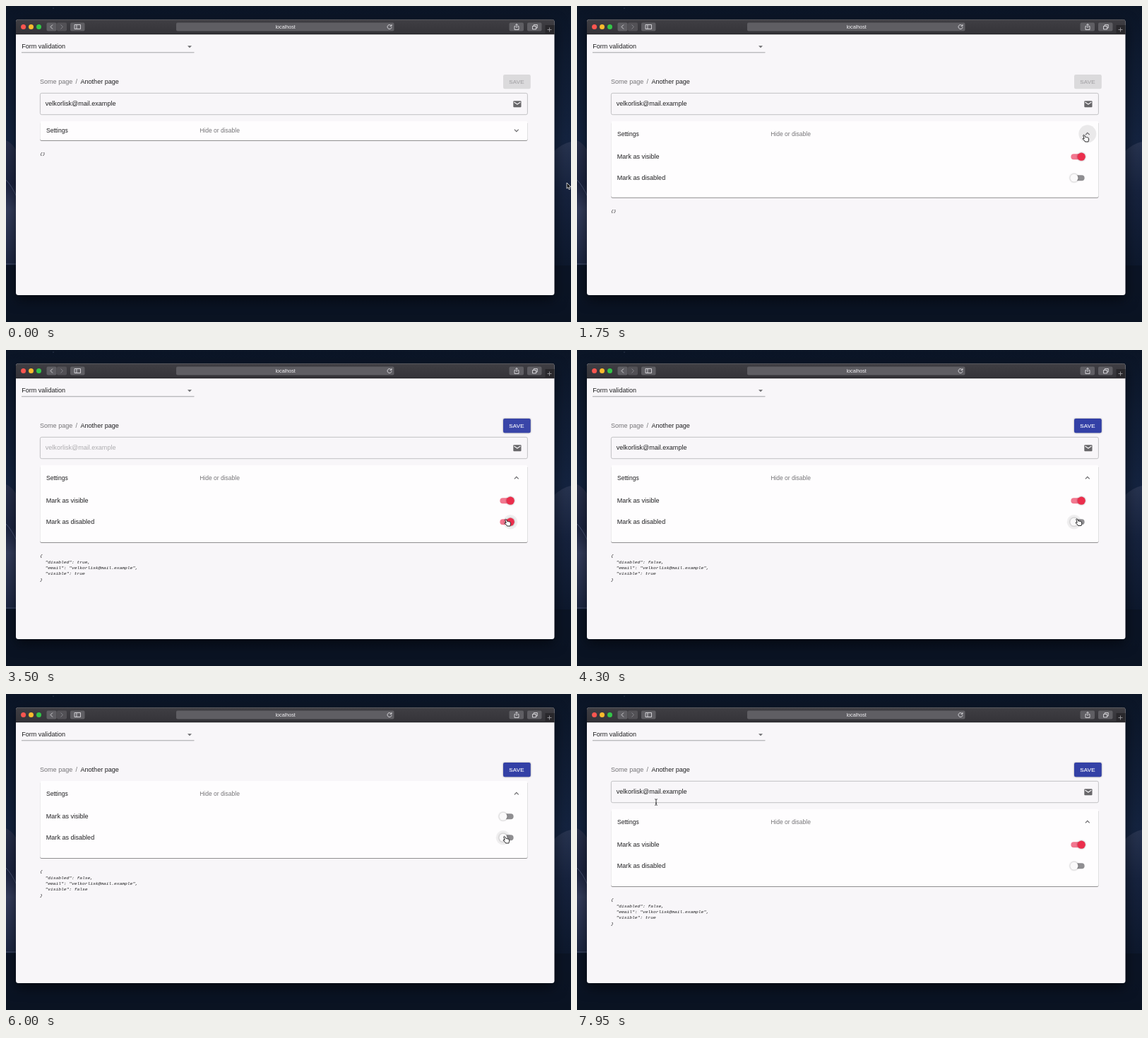
Recreate the animation shown at these times as an HTML page. Size 800 by 447 pixels, loop 8000 ms.

```html
<!DOCTYPE html>
<html lang="en">
<head>
<meta charset="utf-8">
<title>Form validation</title>
<style>
html, body { margin: 0; width: 100%; height: 100%; overflow: hidden; background: #0b1424; }
svg { display: block; width: 800px; height: 447px; }
text { font-family: "Liberation Sans", Arial, sans-serif; font-size: 9.05px; fill: #202022; white-space: pre; }
.small { font-size: 8.5px; }
.dim { fill: #767578; }
.json text { font-family: "Liberation Mono", "Courier New", monospace; font-size: 6.26px; font-style: italic; }
.btn { fill: #5f5e63; }
.ico { fill: none; stroke: #dddce0; stroke-width: .9; }
.paper { fill: #fefdfe; filter: drop-shadow(0 1px .7px rgba(0,0,0,.42)); }
.lift { filter: drop-shadow(0 .7px .8px rgba(0,0,0,.4)); }
.win { filter: drop-shadow(0 6px 9px rgba(0,0,0,.55)); }
</style>
</head>
<body>
<svg viewBox="0 0 800 447">
  <defs>
    <linearGradient id="sky" x1="0" y1="0" x2="0" y2="1">
      <stop offset="0" stop-color="#0b1526"/><stop offset=".42" stop-color="#14233f"/>
      <stop offset=".8" stop-color="#0e1a30"/><stop offset="1" stop-color="#0a1322"/>
    </linearGradient>
    <linearGradient id="duneL" x1="0" y1="0" x2="0" y2="1">
      <stop offset="0" stop-color="#28304b"/><stop offset=".35" stop-color="#1c2440"/>
      <stop offset=".55" stop-color="#343d5c"/><stop offset="1" stop-color="#1d2742"/>
    </linearGradient>
    <linearGradient id="duneR" x1="0" y1="0" x2="0" y2="1">
      <stop offset="0" stop-color="#27334f"/><stop offset=".4" stop-color="#16223d"/>
      <stop offset="1" stop-color="#0d182c"/>
    </linearGradient>
    <linearGradient id="bar" x1="0" y1="0" x2="0" y2="1">
      <stop offset="0" stop-color="#403f44"/><stop offset="1" stop-color="#343338"/>
    </linearGradient>
    <clipPath id="clip"><rect id="clipBox" x="48" width="691" y="0"/></clipPath>
  </defs>

  <rect width="800" height="447" fill="url(#sky)"/>
  <path d="M0 190Q8 193 16 206V366H0Z" fill="url(#duneL)"/>
  <path d="M0 246Q8 254 16 272" fill="none" stroke="#4a5474"/>
  <path d="M0 365H16" stroke="#46506c"/>
  <path d="M774 207Q788 194 800 192V372H774Z" fill="url(#duneR)"/>
  <path d="M0 367H800V447H0Z" fill="#0a1323" opacity=".7"/>
  <circle cx="67" cy="3" r=".6" fill="#53607c"/>

  <rect class="win" x="14" y="19" width="762.5" height="390" rx="3.5" fill="#f8f6f9"/>
  <path d="M14 40V22.5Q14 19 17.5 19H773Q776.5 19 776.5 22.5V40Z" fill="url(#bar)"/>
  <path d="M17 19.4H773" stroke="#68676c" stroke-width=".7"/>
  <path d="M14 39.8H776.5" stroke="#19181b" stroke-width=".8"/>
  <circle cx="24.6" cy="29.5" r="3.5" fill="#fb5650"/>
  <circle cx="35.5" cy="29.5" r="3.5" fill="#fcbb2d"/>
  <circle cx="46.5" cy="29.5" r="3.5" fill="#33c648"/>
  <g class="btn">
    <rect x="57.5" y="23.5" width="14" height="12" rx="2"/>
    <rect x="72" y="23.5" width="14" height="12" rx="2" opacity=".65"/>
    <rect x="91" y="23.5" width="20.5" height="12" rx="2"/>
    <rect x="241" y="23.5" width="308.5" height="12" rx="2"/>
    <rect x="712.5" y="23.5" width="20.5" height="12" rx="2"/>
    <rect x="738" y="23.5" width="20.5" height="12" rx="2"/>
  </g>
  <g class="ico">
    <path d="M66 26.5L63 29.5L66 32.5"/>
    <path d="M77.5 26.5L80.5 29.5L77.5 32.5" stroke="#8b8a8f"/>
    <path d="M97 26.5H105.5V32.5H97ZM100 26.5V32.5"/>
    <path d="M545.6 28A3 3 0 1 0 546 30M546 26V28.4H543.6"/>
    <path d="M721.5 28.5H720V33.5H726V28.5H724.5M723 31V25.5M721.4 27L723 25.4L724.6 27"/>
    <path d="M745.5 28.5H750.5V33H745.5ZM747.3 28.5V26.5H752.3V31H750.5"/>
  </g>
  <path d="M763.5 40V27H776.5V40Z" fill="#29282c"/>
  <path class="ico" d="M766.5 33.5H772.5M769.5 30.5V36.5" style="stroke:#99989d"/>
  <text x="395.7" y="32.1" text-anchor="middle" style="font-size:7.2px;fill:#f1f0f3">localhost</text>

  <text x="22.2" y="59.6">Form validation</text>
  <path d="M22 65.8H266.5" stroke="#8f8e91" stroke-width=".8"/>
  <path d="M257 56.2H263L260 59.2Z" fill="#6c6b6e"/>
  <text class="dim" x="48" y="110.2">Some page</text>
  <text class="dim" x="98.6" y="110.2">/</text>
  <text x="105.5" y="110.2">Another page</text>
  <rect id="save" x="704" y="97" width="38.8" height="20.3" rx="2.2"/>
  <text id="saveText" x="712.2" y="110" style="font-size:7.92px;letter-spacing:.25px;stroke-width:.15px">SAVE</text>

  <g id="field">
    <rect x="48.4" y="123.3" width="690" height="30.4" rx="2.2" fill="none" stroke="#bcbbbe" stroke-width=".9"/>
    <text id="email" x="55.8" y="141.4"></text>
    <rect x="718.3" y="134.3" width="11.2" height="8.9" rx="1" fill="#68676a"/>
    <path d="M719.4 136L723.9 139L728.4 136" fill="none" stroke="#f8f6f9" stroke-width="1.1"/>
  </g>

  <g id="page">
    <rect id="paper" class="paper" x="48.2" y="0" width="690.3" rx="2.2"/>
    <g id="head">
      <text class="small" x="57" y="3">Settings</text>
      <text class="small dim" x="274.2" y="3">Hide or disable</text>
      <circle id="ripple" cx="722.8" r="12.5"/>
      <path id="chevron" d="M-2.9 -1.5L0 1.5L2.9 -1.5" fill="none" stroke="#69686b" stroke-width="1.2"/>
    </g>
    <g clip-path="url(#clip)">
      <text x="56.8" y="53.4">Mark as visible</text>
      <text x="56.8" y="83.4">Mark as disabled</text>
      <g id="switches"></g>
    </g>
    <g id="json" class="json"></g>
  </g>

  <g id="cursor" stroke-linejoin="round">
    <path d="M0 0V8.2L1.9 6.5L3.2 9.6L4.7 9L3.4 6H6Z" fill="#111" stroke="#f4f4f4" stroke-width=".8"/>
    <path d="M.7 .9Q1.7 -.3 2.6 1L3.9 3.7Q4.8 3 5.4 3.8Q6.4 3.3 6.9 4.2Q8.1 3.9 8.4 5.2Q9 7.2 8.3 8.4L8 10H3.5L2.9 8.7L.2 6.4Q-.2 5.2 1 5.2L2.2 5.8Z" fill="#fff" stroke="#18181a" stroke-width=".9"/>
    <path d="M-1.8 -4.3Q0 -4.3 0 -3.3Q0 -4.3 1.8 -4.3M0 -3.4V3.4M-1.8 4.3Q0 4.3 0 3.3Q0 4.3 1.8 4.3M-1 1.5H1" fill="none" stroke="#2a2a2c" stroke-width=".9"/>
  </g>
</svg>
<script>
const LOOP = 8000, MAIL = "velkorlisk@mail.example";
const OPEN = 1500, DISABLE = 3310, ENABLE = 4060, HIDE = 5350, SHOW = 6850;
const $ = id => document.getElementById(id);
const set = (el, attrs) => { for (const k in attrs) el.setAttribute(k, attrs[k]); };
const add = (parent, tag, attrs) => {
  const el = document.createElementNS("http://www.w3.org/2000/svg", tag);
  set(el, attrs);
  return parent.appendChild(el);
};
const clamp = v => Math.min(1, Math.max(0, v));
const mix = (a, b, p) => a + (b - a) * p;
const blend = (a, b, p) => `rgb(${a.map((v, i) => Math.round(mix(v, b[i], p)))})`;

// cubic-bezier(.4, 0, .2, 1)
function ease(x) {
  if (x <= 0 || x >= 1) return clamp(x);
  let lo = 0, hi = 1, u = .5;
  for (let i = 0; i < 20; i++) {
    u = (lo + hi) / 2;
    const bx = 1.2 * u * (1 - u) ** 2 + .6 * u * u * (1 - u) + u ** 3;
    bx < x ? lo = u : hi = u;
  }
  return 3 * u * u * (1 - u) + u ** 3;
}
const ramp = (t, start, dur) => ease((t - start) / dur);
const pulse = (t, start, rise, hold, fall) =>
  clamp((t - start) / rise) * (1 - clamp((t - start - rise - hold) / fall));

// time, x, y of the pointer's hot spot
const path = [
  [0, 794, 250], [40, 794, 250], [950, 716, 182], [1800, 716, 182],
  [2300, 706, 239], [4250, 706, 239], [4800, 708, 218], [5050, 708, 218],
  [5220, 706, 212], [5650, 706, 212], [5900, 704, 201], [6250, 704, 201],
  [6600, 703, 177], [7420, 703, 177]
];
function pointer(t) {
  const [t0, x0, y0] = path[path.length - 1];
  if (t >= t0) {
    const p = clamp((t - t0) / 510), u = p * p * (3 - 2 * p), v = 1 - u;
    return [v * v * x0 + 2 * u * v * 400 + u * u * 112, v * v * y0 + 2 * u * v * 40 + u * u * 153];
  }
  const i = path.findIndex(k => k[0] > t), a = path[i - 1], b = path[i];
  const p = (t - a[0]) / (b[0] - a[0]), s = p * p * (3 - 2 * p);
  return [mix(a[1], b[1], s), mix(a[2], b[2], s)];
}

function makeSwitch(y) {
  const g = add($("switches"), "g", { transform: `translate(0 ${y})` });
  const track = add(g, "rect", { x: 699.4, y: -4, width: 19.2, height: 8, rx: 4 });
  const halo = add(g, "circle", { r: 10.2 });
  const thumb = add(g, "circle", { r: 5.6, class: "lift" });
  return (on, hover, glow) => {
    const cx = mix(703.9, 714.2, on);
    set(track, { fill: blend([143, 142, 145], [242, 119, 143], on) });
    set(thumb, { cx, fill: blend([250, 249, 250], [235, 46, 76], on) });
    set(halo, { cx, fill: glow ? "#eb2e4c" : "#000", opacity: glow ? glow * .22 : hover ? .06 : 0 });
  };
}
const visibleSwitch = makeSwitch(50.2), disabledSwitch = makeSwitch(80.2);
const lines = [0, 1, 2, 3, 4].map(i => add($("json"), "text", { x: 48, y: i * 8.35 }));
$("email").textContent = MAIL;

function draw(t) {
  const shown = t < HIDE || t >= SHOW;
  const disabled = t >= DISABLE && t < ENABLE;
  const dirty = t >= DISABLE;
  const top = shown ? 163 : 123;
  const open = ramp(t, OPEN, 300), head = ramp(t, OPEN, 150);
  const height = mix(27, 109, open), headY = mix(13.2, 17.8, head);

  const blue = ramp(t, DISABLE, 250);
  set($("save"), { fill: blend([219, 218, 220], [51, 64, 166], blue), class: dirty ? "lift" : "" });
  const label = blend([166, 165, 168], [250, 250, 255], blue);
  $("saveText").style.fill = $("saveText").style.stroke = label;

  set($("field"), { visibility: shown ? "visible" : "hidden" });
  $("email").style.fill = disabled ? "#adacaf" : "#202022";

  set($("page"), { transform: `translate(0 ${top})` });
  set($("paper"), { height });
  set($("clipBox"), { y: Math.min(height, 2 * headY), height: Math.max(0, height - 2 * headY) });
  set($("head"), { transform: `translate(0 ${headY})` });
  set($("chevron"), { transform: `translate(722.8 0) rotate(${180 * open})` });
  set($("ripple"), { opacity: .08 * pulse(t, OPEN, 150, 200, 250) });

  const [x, y] = pointer(t);
  const over = row => open > .9 && Math.abs(x - 709) < 18 && Math.abs(y - top - row) < 12;
  const onVisible = over(50), onDisabled = over(80);
  visibleSwitch(1 - ramp(t, HIDE, 150) + ramp(t, SHOW, 150), onVisible, pulse(t, SHOW, 250, 100, 350));
  disabledSwitch(ramp(t, DISABLE, 150) - ramp(t, ENABLE, 150), onDisabled, 0);

  const text = dirty
    ? ["{", `  "disabled": ${disabled},`, `  "email": "${MAIL}",`, `  "visible": ${shown}`, "}"]
    : ["{}"];
  lines.forEach((el, i) => {
    const s = text[i] || "";
    if (el.textContent !== s) el.textContent = s;
  });
  set($("json"), { transform: `translate(0 ${mix(48, 130.2, open)})` });

  const onHead = x > 48 && x < 739 && y > top && y < top + 2 * headY;
  const onField = shown && x > 48 && x < 739 && y > 123 && y < 154;
  const kind = onField ? 2 : onHead || onVisible || onDisabled ? 1 : 0;
  set($("cursor"), { transform: `translate(${x} ${y})` });
  [...$("cursor").children].forEach((el, i) => set(el, { visibility: i === kind ? "visible" : "hidden" }));
}

const start = performance.now();
function tick(now) {
  draw(Math.max(0, now - start) % LOOP);
  requestAnimationFrame(tick);
}
draw(0);
requestAnimationFrame(tick);
</script>
</body>
</html>
```
